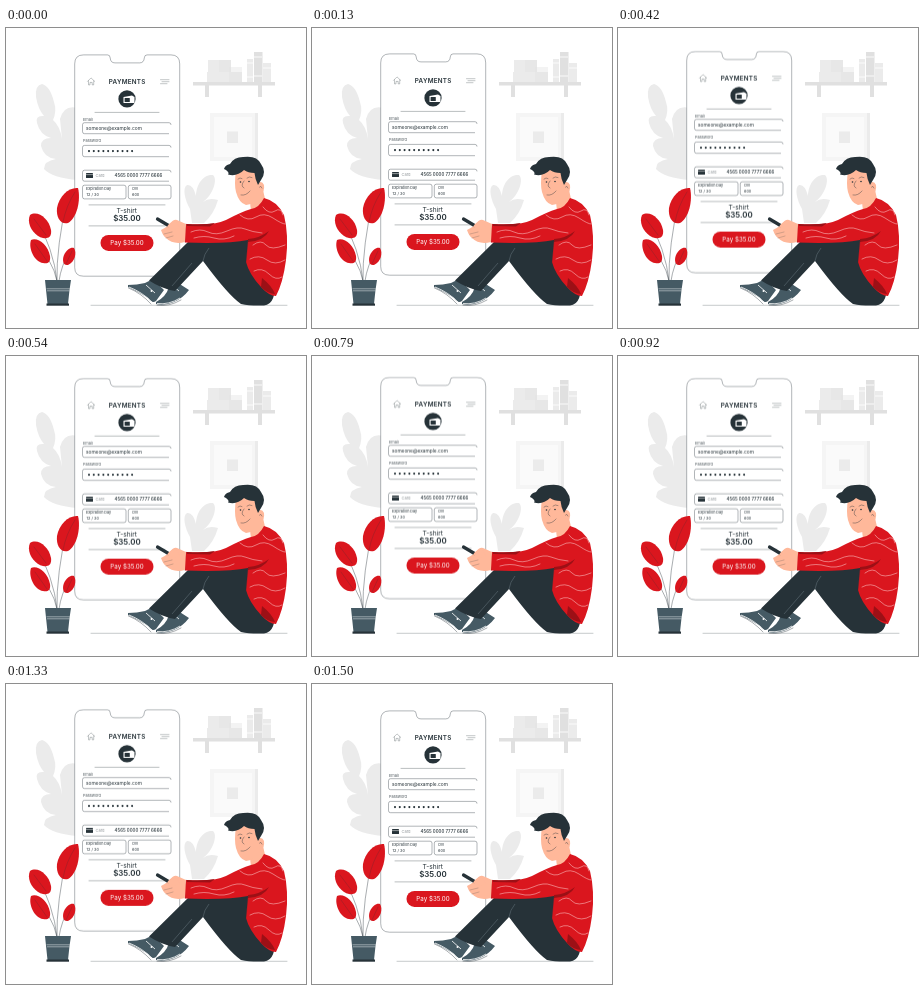
Write an HTML page that moves like this. It is 300 px wide and 300 px high and loops after 1540 ms.

```html
<!DOCTYPE html>
<html lang="en">
<head>
<meta charset="utf-8">
<title>Payments</title>
<style>
html, body { margin: 0; width: 100%; height: 100%; overflow: hidden; background: #fff; }
svg { display: block; width: 100vw; height: 100vh; }
text { font-family: Inter, "Open Sans", sans-serif; fill: #263238; }
.line { fill: none; stroke: #263238; stroke-width: .4; stroke-linecap: round; stroke-linejoin: round; }
.box { fill: #fff; stroke: #263238; stroke-width: .36; }
.dark { fill: #263238; }
.slate { fill: #455a64; }
.red { fill: #da161e; }
.shade { fill: #9c1016; }
.skin { fill: #ffb89a; }
.pale { fill: #ebebeb; }
.mid { fill: #e0e0e0; }
.soft { fill: #f5f5f5; }
.wave { fill: none; stroke: #ffd9d9; stroke-width: .5; stroke-linecap: round; }
.mid-text { text-anchor: middle; }
.label { font-size: 3.9px; opacity: .8; }
#phone { animation: float 1540ms linear infinite; }
@keyframes float {
  0% { transform: translateY(-.1px); }
  47.73% { transform: translateY(-6px); }
  96.43% { transform: translateY(0); }
  97.4%, 100% { transform: translateY(-.1px); }
}
</style>
</head>
<body>
<svg viewBox="0 0 300 300">
  <!-- room -->
  <g>
    <path class="pale" d="M36 56Q29 57 30 69Q32 81 38 88Q29 87 31 95Q34 107 45 110Q35 110 35 118Q38 130 50 131Q38 133 38 141Q46 150 72 152V80Q58 76 54 91L56 111Q54 98 47 92Q51 83 48 74Q44 58 36 56Z"/>
    <path class="pale" d="M207 147C197 146 190 157 190 168Q187 156 181 157C176 160 179 172 184 181L186 195H198Q208 186 212 172Q203 169 197 174C207 167 212 151 207 147Z"/>
    <rect class="soft" x="204" y="85" width="48" height="48"/>
    <rect x="208" y="89" width="38" height="40" fill="#fafafa"/>
    <path class="pale" d="M249 85H252V133H249Z"/>
    <rect class="pale" x="221" y="103.500" width="11" height="11.500"/>
    <rect class="mid" x="187" y="54" width="82" height="3.500"/>
    <path class="mid" d="M199 57H203V69H199ZM252 57H256V69H252Z"/>
    <rect class="pale" x="202" y="32" width="23" height="12"/>
    <rect class="mid" x="213" y="32" width="12" height="12" opacity=".4"/>
    <rect class="pale" x="201" y="44" width="35" height="10"/>
    <rect class="mid" x="223" y="39" width="13" height="15" opacity=".4"/>
    <rect class="pale" x="241" y="31" width="6" height="23"/>
    <rect class="mid" x="248" y="24" width="8.500" height="30"/>
    <rect class="pale" x="257" y="35" width="8" height="19"/>
    <path d="M241 35H247M241 49H247M248 29H256M248 48H256M257 40H265" stroke="#fff" stroke-width=".8"/>
  </g>
  <path class="line" d="M85 277.300H281" opacity=".65"/>

  <g id="phone">
    <path class="box" d="M77.500 27H101.500Q104 27 104.200 30Q104.500 35 109 35H133.500Q138 35 138.300 30Q138.500 27 141 27H165Q173.700 27 173.700 36V239.500Q173.700 248.300 165 248.300H77.500Q68.700 248.300 68.700 239.500V36Q68.700 27 77.500 27Z"/>
    <path class="line" d="M81.500 53.500L85 50L88.700 53.500M82.500 53V57H84V54.500H86.200V57H87.700V53M154.500 51.800H163M156 53.800H163M154.500 55.800H161" opacity=".7"/>
    <text class="mid-text" x="121.200" y="55.900" font-size="6.300" font-weight="600" letter-spacing=".25">PAYMENTS</text>
    <circle class="dark" cx="121" cy="71" r="8.600"/>
    <path d="M117.500 69L126 67.500L128.500 69V75H117.500Z" fill="#fff"/>
    <rect class="dark" x="118.600" y="70" width="5.200" height="4" rx=".5"/>
    <path class="line" d="M89 84.500H153M83 177H159M83 198H159" opacity=".8"/>

    <text class="label" x="77" y="93">Email</text>
    <path class="box" d="M163 105.800H78.500Q76.500 105.800 76.500 103.800V96.800Q76.500 94.800 78.500 94.800H163Q165 94.800 165 97"/>
    <text x="80" y="102" font-size="4.800">someone@example.com</text>
    <text class="label" x="77" y="114">Password</text>
    <path class="box" d="M163 128.800H78.500Q76.500 128.800 76.500 126.800V119.500Q76.500 117.500 78.500 117.500H163Q165 117.500 165 119.700"/>
    <path d="M83 123.200H127" stroke="#263238" stroke-width="2.100" stroke-linecap="round" stroke-dasharray="0 4.790"/>

    <path class="box" d="M163 153.300H78.500Q76.500 153.300 76.500 151.300V144.300Q76.500 142.300 78.500 142.300H163Q165 142.300 165 144.500"/>
    <rect class="dark" x="80" y="145.200" width="7" height="5" rx=".6"/>
    <path d="M80 146.700H87" stroke="#fff" stroke-width=".5"/>
    <text x="89.500" y="149.300" font-size="4" opacity=".5">Card</text>
    <text x="108.600" y="149.500" font-size="4.450" font-weight="500">4565 0000 7777 6666</text>

    <rect class="box" x="76.500" y="157.300" width="43.500" height="13.700" rx="2"/>
    <rect class="box" x="122.300" y="157.300" width="42.700" height="13.700" rx="2"/>
    <text x="80" y="162.600" font-size="3.700">Expiration Day</text>
    <text x="80.500" y="168.300" font-size="3.900">12 / 30</text>
    <text x="126" y="162.600" font-size="3.700">cvv</text>
    <text x="126" y="168.300" font-size="3.900">600</text>

    <text class="mid-text" x="120.700" y="185" font-size="6.600">T-shirt</text>
    <text class="mid-text" x="120.900" y="193.200" font-size="7.900" font-weight="600">$35.00</text>
    <rect class="red" x="94.500" y="207" width="53" height="16" rx="8"/>
    <text class="mid-text" x="121" y="217.300" font-size="6.200" style="fill:#fff">Pay $35.00</text>
  </g>

  <!-- potted plant -->
  <path class="line" d="M51 253Q50 220 62 166M51 253Q48 222 29 188M51 253Q47 232 28 214M53 253Q55 238 64 222"/>
  <g class="red">
    <path d="M72 160C75 172 71 190 62 195C55 197 50 190 51 180C53 168 63 159 72 160Z"/>
    <path d="M24 187C32 182 43 191 45 202C46 209 42 211 37 210C28 208 20 196 24 187Z"/>
    <path d="M25 212C32 209 42 217 44 228C45 235 41 236 37 235C29 234 22 221 25 212Z"/>
    <path d="M68 220C71 225 69 234 62 237C57 238 56 232 58 227C61 221 65 219 68 220Z"/>
  </g>
  <path class="line" d="M57 194Q60 178 69 164M40 207L28 191M41 233L29 216M60 236L66 223" opacity=".5"/>
  <path class="slate" d="M39 252H65L63.500 262L62 276H41.500Z"/>
  <path d="M40.500 260.800H63.800M41 262.800H63.500" stroke="#fff" stroke-width=".45"/>
  <path class="dark" d="M40.500 275.500H63V277.700H40.500Z"/>

  <!-- buyer -->
  <g>
    <path class="slate" d="M122 257Q131 257 139 255L147 251L158 262L150 273Q146 276 142 270Q133 264 122 259Z"/>
    <path class="slate" d="M150 274Q160 269 163 259L169 253L183 262Q177 270 168 274Q159 278 150 276Z"/>
    <path d="M123 259Q136 264 146 274M151 275.500Q163 277 174 270M140 257L149 265M167 258L173 263" fill="none" stroke="#fff" stroke-width=".8"/>
    <circle cx="145.500" cy="263" r="1" fill="#fff"/>
    <path class="line" d="M122.500 260Q135 265 145 276M151 277.200Q163 279 175 272"/>
    <path class="dark" d="M183 213Q190 211 205 212L242 211L268 252Q271 276 258 277.500Q244 278 235 276Q222 267 197 233L169 263Q156 261 143 252.500Z"/>
    <path d="M197 233Q198 226 203 220M186 235L166 258" fill="none" stroke="#71818a" stroke-width=".45"/>
    <path class="skin" d="M243 165L256 157L259 171Q255 182 245 183Z"/>
    <path class="red" d="M245 181Q253 180 258 170Q271 173 278 187Q283 207 280 232Q277 255 270 268Q263 268 255 259Q243 246 240 234L242 212Q222 216 179 214.500Q177 206 180 196Q207 198 220 192Q235 184 245 181Z"/>
    <path class="shade" d="M181 196Q198 197 209 195L204 198.500L181 198ZM242 211Q254 210 263 203Q258 213 242 214ZM256 250Q266 258 269 266Q262 266 255 259Z"/>
    <path class="line" d="M240 234L242 213M179 214.500Q177 206 180 196" opacity=".6"/>
    <g class="wave">
      <path d="M234 187Q242 194 250 189T267 190T279 196"/>
      <path d="M185 204Q194 200 202 204T221 203T239 201T256 205"/>
      <path d="M188 210Q198 207 208 210T228 208"/>
      <path d="M257 179Q263 187 269 183T277 187"/>
      <path d="M247 217Q255 211 260 217T279 217"/>
      <path d="M244 231Q253 226 261 232T279 232"/>
      <path d="M248 243Q256 239 263 246T276 249"/>
    </g>
    <path class="skin" d="M230 143Q228 156 230 164Q233 175 240 177Q249 177 254 166Q259 164 258 157Q256 152 252 155L250 138L236 137Z"/>
    <path class="dark" d="M218 141Q219 137 224 136Q228 129 237 129Q251 127 255 136Q261 144 255 152L252 157Q249 151 248.500 145Q242 145 238 142Q231 149 222 146.500Q224 144 218 141Z"/>
    <path class="line" d="M232 151Q234 149 236 150.500M241 150Q243 148 246 149.500M238 153Q234 158 238 160M235 167Q240 168 244 163M253.500 159Q255 157 256 160"/>
    <circle class="dark" cx="234.500" cy="154" r=".8"/>
    <circle class="dark" cx="243" cy="153.500" r=".8"/>
    <path class="skin" d="M155 202Q159 200 163 197Q167 191 171 192L180 196L179 214Q167 217 160 210Q157 208 155 202Z"/>
    <path class="line" d="M158 206L166 204M160 210L167 208" opacity=".5"/>
    <path d="M151.500 191L162.500 197.500" stroke="#263238" stroke-width="3.200" stroke-linecap="round"/>
    <path class="skin" d="M161 199Q163 194 170 193L174 200Q167 203 161 199Z"/>
  </g>
</svg>
</body>
</html>
```
